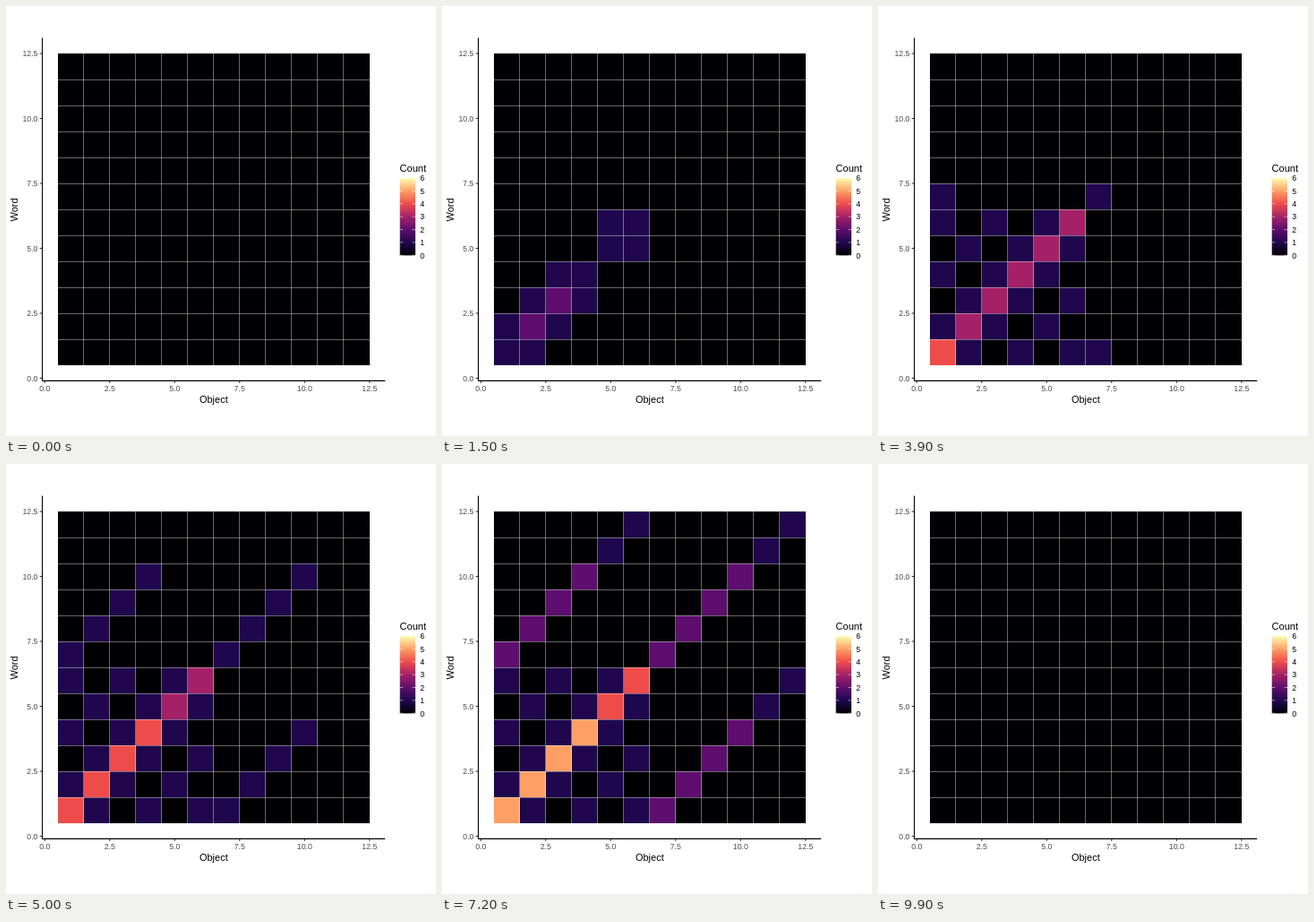
Animation of 480 by 480 pixels, one loop 10000 ms. Source, as an HTML page:

```html
<!DOCTYPE html>
<html>
<head>
<meta charset="utf-8">
<style>
  html, body { margin: 0; width: 100%; height: 100%; overflow: hidden; background: #fff; }
  svg { display: block; width: 100vw; height: 100vh; }
  text { font: 8.8px "Liberation Sans", Arial, sans-serif; }
  .title { font-size: 11px; }
  .tick { fill: #4d4d4d; }
</style>
</head>
<body>
<svg id="plot" viewBox="0 0 480 480">
  <defs><linearGradient id="ramp" x1="0" y1="1" x2="0" y2="0"></linearGradient></defs>
</svg>
<script>
const plot = document.getElementById("plot");
const SIZE = 12, CELL = 29, LEFT = 58, BOTTOM = 401;
const PALETTE = [
  [0, 0, 3], [32, 7, 77], [94, 14, 110], [164, 33, 103],
  [238, 76, 75], [254, 160, 101], [252, 254, 180]
];

function add(tag, attrs, content = "", parent = plot) {
  const node = document.createElementNS("http://www.w3.org/2000/svg", tag);
  for (const key in attrs) node.setAttribute(key, attrs[key]);
  node.textContent = content;
  parent.append(node);
  return node;
}
const line = (x1, y1, x2, y2, stroke, width = 1.07) =>
  add("line", { x1, y1, x2, y2, stroke, "stroke-width": width });
const label = (x, y, content, anchor, cls = "", transform = "") =>
  add("text", { x, y, "text-anchor": anchor, class: cls, transform }, content);

function color(value) {
  const low = PALETTE[Math.floor(value)], high = PALETTE[Math.ceil(value)];
  return `rgb(${low.map((c, i) => Math.round(c + (high[i] - c) * (value % 1)))})`;
}

// Cells, row by row from the bottom
const cells = [];
for (let word = 0; word < SIZE; word++)
  for (let object = 0; object < SIZE; object++)
    cells.push(add("rect", {
      x: LEFT + object * CELL, y: BOTTOM - (word + 1) * CELL, width: CELL, height: CELL,
      "shape-rendering": "crispEdges"
    }));
for (let i = 1; i < SIZE; i++) {
  const x = LEFT - 0.5 + i * CELL, y = BOTTOM + 0.5 - i * CELL;
  line(x, 53, x, 401, "rgba(255,255,255,.4)", 1);
  line(58, y, 406, y, "rgba(255,255,255,.4)", 1);
}

// Axes
for (let v = 0; v <= 12.5; v += 2.5) {
  const x = 43.3 + v * CELL, y = 415.5 - v * CELL;
  line(x, 418.4, x, 421.1, "#333");
  line(37.7, y, 40.4, y, "#333");
  label(x, 430.2, v.toFixed(1), "middle", "tick");
  label(35.5, y + 3.1, v.toFixed(1), "end", "tick");
}
line(40.5, 35.6, 40.5, 418.9, "#000");
line(40, 418.4, 423.2, 418.4, "#000");
label(231.8, 443, "Object", "middle", "title");
label(0, 0, "Word", "middle", "title", "translate(13.3 227.5) rotate(-90)");

// Legend
const ramp = document.getElementById("ramp");
PALETTE.forEach((_, i) => add("stop", { offset: i / 6, "stop-color": color(i) }, "", ramp));
label(439.6, 185, "Count", "start", "title");
add("rect", { x: 439.7, y: 192, width: 17.3, height: 86.4, fill: "url(#ramp)" });
for (let i = 0; i <= 6; i++) {
  const y = 278.2 - i * 14.35;
  line(439.7, y, 443.2, y, "#fff", 0.5);
  line(453.5, y, 457, y, "#fff", 0.5);
  label(462.3, y + 3.3, i, "start");
}

// Each trial pairs two items; later trials repeat i with i + 6
const trials = [[1, 2], [3, 4], [5, 6], [2, 3], [1, 4], [2, 5], [1, 6], [4, 5], [3, 6]];
for (let i = 0; i < 18; i++) trials.push([i % 6 + 1, i % 6 + 7]);

// Number of trials shown; .5 is the blend between two states
function progress(time) {
  let left = time;
  for (let k = 0; k < trials.length; k++) {
    if (left < 300) return k;
    left -= 300;
    if (k < 17 && k !== 12) {
      if (left < 100) return k + 0.5;
      left -= 100;
    }
  }
  return trials.length;
}

let shown = -1;
function draw(now) {
  const done = progress((now + 100) % 10000);
  if (done !== shown) {
    shown = done;
    const counts = new Array(SIZE * SIZE).fill(0);
    trials.forEach((pair, i) => {
      const weight = Math.max(0, Math.min(1, done - i));
      for (const word of pair)
        for (const object of pair) counts[(word - 1) * SIZE + object - 1] += weight;
    });
    cells.forEach((cell, i) => cell.setAttribute("fill", color(counts[i])));
  }
}

const start = performance.now();
function loop() {
  draw(performance.now() - start);
  requestAnimationFrame(loop);
}
loop();
</script>
</body>
</html>
```
